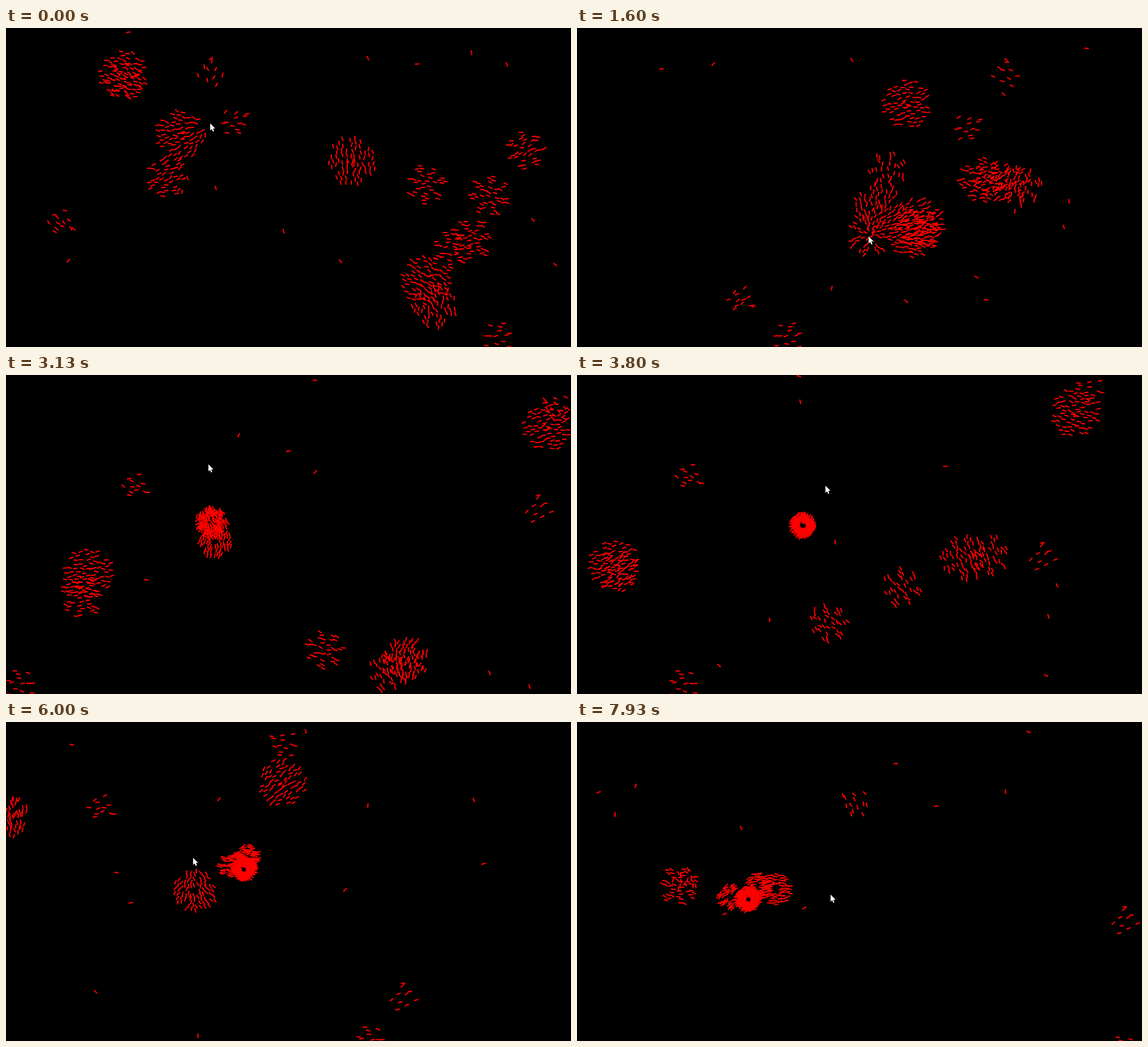
An HTML page with a canvas that plays this animation: 996x562 px, repeating every 8000 ms.

```html
<!DOCTYPE html>
<html lang="en">
<head>
<meta charset="utf-8">
<title>Flocking</title>
<style>
  html, body { margin: 0; width: 100%; height: 100%; overflow: hidden; background: #000; }
  canvas { display: block; }
</style>
</head>
<body>
<canvas id="stage" width="996" height="562"></canvas>
<script>
const W = 996, H = 562, FLOOR = H + 30;
const LOOP = 8000, TICK = 200 / 3, LAST = 119;
const MOMENTS = [0, 24, 37, 57, 75, 106, LAST];
const DASH = 4, MOUSE_REACH = 170, STRAYS = 12, GLIDE = 1834;
const ctx = document.getElementById('stage').getContext('2d');

const frac = v => v - Math.floor(v);
const random = seed => frac(Math.sin(seed * 12.9898 + 4) * 43758.5453);
const near = (distance, reach) => Math.exp(-((distance / reach) ** 2));
function smooth(from, to, v) {
  const s = Math.min(1, Math.max(0, (v - from) / (to - from)));
  return s * s * (3 - 2 * s);
}

// Paths run straight on through the walls; these give points behind a wall.
const left = (x, y) => [-x, y];
const right = (x, y) => [2 * W - x, y];
const below = (x, y) => [x, 2 * FLOOR - y];

// Folds a coordinate back between the walls, with the sign of its direction.
function bounce(v, size) {
  const m = ((v % (2 * size)) + 2 * size) % (2 * size);
  return m > size ? [2 * size - m, -1] : [m, 1];
}

// A path maps moments to points; it is smoothed by cubic Hermite pieces.
function curve(path) {
  const knots = Object.entries(path).map(([m, [x, y]]) => ({ t: MOMENTS[m], x, y }));
  const slope = (i, axis) => {
    const a = knots[Math.max(0, i - 1)], b = knots[Math.min(knots.length - 1, i + 1)];
    return (b[axis] - a[axis]) / (b.t - a.t);
  };
  return tick => {
    let i = 0;
    while (i < knots.length - 2 && tick >= knots[i + 1].t) i++;
    const p = knots[i], q = knots[i + 1];
    const span = q.t - p.t, s = (tick - p.t) / span;
    const along = axis => {
      const v = slope(i, axis) * span, w = slope(i + 1, axis) * span;
      const a = 2 * (p[axis] - q[axis]) + v + w;
      const b = 3 * (q[axis] - p[axis]) - 2 * v - w;
      return [((a * s + b) * s + v) * s + p[axis], (3 * a * s + 2 * b) * s + v];
    };
    const [x, vx] = along('x'), [y, vy] = along('y');
    return { x, y, vx, vy };
  };
}

const mouseAt = curve([[360, 168], [514, 367], [310, 156], [438, 195], [484, 236], [195, 246], [447, 304]]);
const CORE = { 0: [308, 188], 1: [532, 318], 2: [362, 265], 3: [398, 265], 4: [466, 272], 5: [348, 252], 6: [302, 312] };
const CORE_BELOW = { 4: below(...CORE[4]), 5: below(...CORE[5]), 6: below(...CORE[6]) };
const coreAt = curve(CORE);

const flocks = [];
const boids = [];
function flock(size, path) {
  const group = { at: curve(path), spread: 14 + 3.5 * Math.sqrt(size) };
  flocks.push(group);
  for (let n = 0; n < size; n++) {
    const i = boids.length;
    boids.push({
      group,
      area: frac(0.5 + i * 0.7548777) ** 1.1,
      angle: 2 * Math.PI * frac(0.5 + i * 0.5698403),
      turn: (random(i) - 0.5) * 0.85
    });
  }
}

// Flocks that gather in the core.
flock(75, CORE);
flock(30, { ...CORE, 0: [208, 92], 1: [548, 250] });
flock(45, { ...CORE, 0: [285, 262], 1: [515, 365] });
flock(70, { ...CORE, 0: [610, 235], 1: [606, 342], 2: [382, 325] });
flock(30, { ...CORE, 0: [785, 390], 1: [590, 362] });

// Flocks that cross the stage and turn back at a wall.
flock(70, { 0: [208, 84], 1: [582, 135], 4: right(622, 52), 5: right(388, 205), 6: right(320, 290) });
flock(75, { 0: [740, 445], 1: [592, 362], 2: [380, 360], 3: left(65, 335), 4: left(178, 300), 5: left(465, 300), 6: left(350, 295) });
flock(45, { 0: [820, 372], 1: [605, 355], 2: [388, 402], 3: left(72, 345), 4: left(18, 135), 5: left(25, 245), 6: left(180, 288) });
flock(55, { 0: [755, 490], 1: [712, 268], 2: [700, 472], 3: below(680, 322), 4: below(545, 240), 5: below(308, 256), 6: below(270, 308) });
flock(35, { 0: [740, 275], 1: [785, 278], 2: [765, 485], 3: below(572, 375), ...CORE_BELOW });
flock(40, { 0: [852, 295], 1: [732, 270], 2: [670, 470], 3: below(725, 318), ...CORE_BELOW });
flock(35, { 0: [917, 215], 1: [765, 272], 2: [700, 478], 3: [445, 437], 4: [485, 268], 5: [350, 252], 6: [302, 312] });

// Small flocks.
flock(16, { 0: [865, 545], 1: [370, 545], 3: left(190, 546), 4: left(450, 546), 5: left(840, 580), 6: left(965, 580) });
flock(12, { 0: [98, 344], 1: [290, 480], 2: [258, 240], 4: [160, 170], 5: [192, 162], 6: [190, 280] });
flock(13, { 0: [404, 165], 1: [690, 175], 2: [950, 102], 3: right(905, 28), 4: right(640, 60), 5: right(385, 30), 6: right(490, 143) });
flock(10, { 0: [362, 78], 1: [757, 80], 3: right(820, 320), 4: right(638, 503), 5: right(825, 420), 6: right(965, 350) });

// Strays glide straight on.
for (let k = 1; k <= STRAYS; k++) {
  const x = random(k) * W, y = random(k + 50) * H, angle = random(k + 90) * 2 * Math.PI;
  flock(1, { 0: [x, y], 6: [x + GLIDE * Math.cos(angle), y + GLIDE * Math.sin(angle)] });
}

// Flocks contract, leaving a small hole, where they meet the core.
function placeFlock(group, tick, core) {
  const centre = group.at(tick);
  const [x] = bounce(centre.x, W), [y] = bounce(centre.y, FLOOR);
  const pull = smooth(24, 60, tick) * near(Math.hypot(x - core.x, y - core.y), 90);
  group.centre = centre;
  group.radius = group.spread * (1 - 0.5 * pull);
  group.hole = 0.12 * pull;
}

function addDash({ group, area, angle, turn }, mouse) {
  const { centre, radius, hole } = group;
  const r = radius * Math.sqrt(hole + (1 - hole) * area);
  const [x, signX] = bounce(centre.x + r * Math.cos(angle), W);
  const [y, signY] = bounce(centre.y + r * Math.sin(angle), FLOOR);

  // Boids close to the mouse line up with it.
  const speed = Math.hypot(centre.vx, centre.vy) || 1;
  const ux = signX * centre.vx / speed, uy = signY * centre.vy / speed;
  const dx = mouse.x - x, dy = mouse.y - y, distance = Math.hypot(dx, dy) || 1;
  const weight = near(distance, MOUSE_REACH);
  const side = Math.sign(ux * dx + uy * dy) || 1;
  const heading = turn + Math.atan2(
    uy * (1 - weight) + side * weight * dy / distance,
    ux * (1 - weight) + side * weight * dx / distance
  );
  const hx = DASH * Math.cos(heading), hy = DASH * Math.sin(heading);
  ctx.moveTo(x - hx, y - hy);
  ctx.lineTo(x + hx, y + hy);
}

const arrow = new Path2D('M0 0V12.5L2.8 10 4.8 14.5 6.8 13.6 4.9 9.2 8.8 9Z');
function drawMouse({ x, y }) {
  ctx.save();
  ctx.translate(x, y);
  ctx.lineWidth = 1.5;
  ctx.strokeStyle = '#000';
  ctx.stroke(arrow);
  ctx.fillStyle = '#fff';
  ctx.fill(arrow);
  ctx.restore();
}

function draw(ms) {
  const tick = Math.min(LAST, Math.floor((ms % LOOP + 4) / TICK));
  const mouse = mouseAt(tick), core = coreAt(tick);
  ctx.fillStyle = '#000';
  ctx.fillRect(0, 0, W, H);
  for (const group of flocks) placeFlock(group, tick, core);
  ctx.beginPath();
  for (const boid of boids) addDash(boid, mouse);
  ctx.strokeStyle = '#f00';
  ctx.lineWidth = 2.2;
  ctx.stroke();
  drawMouse(mouse);
}

const start = performance.now();
function loop() {
  draw(performance.now() - start);
  requestAnimationFrame(loop);
}
loop();
</script>
</body>
</html>
```
